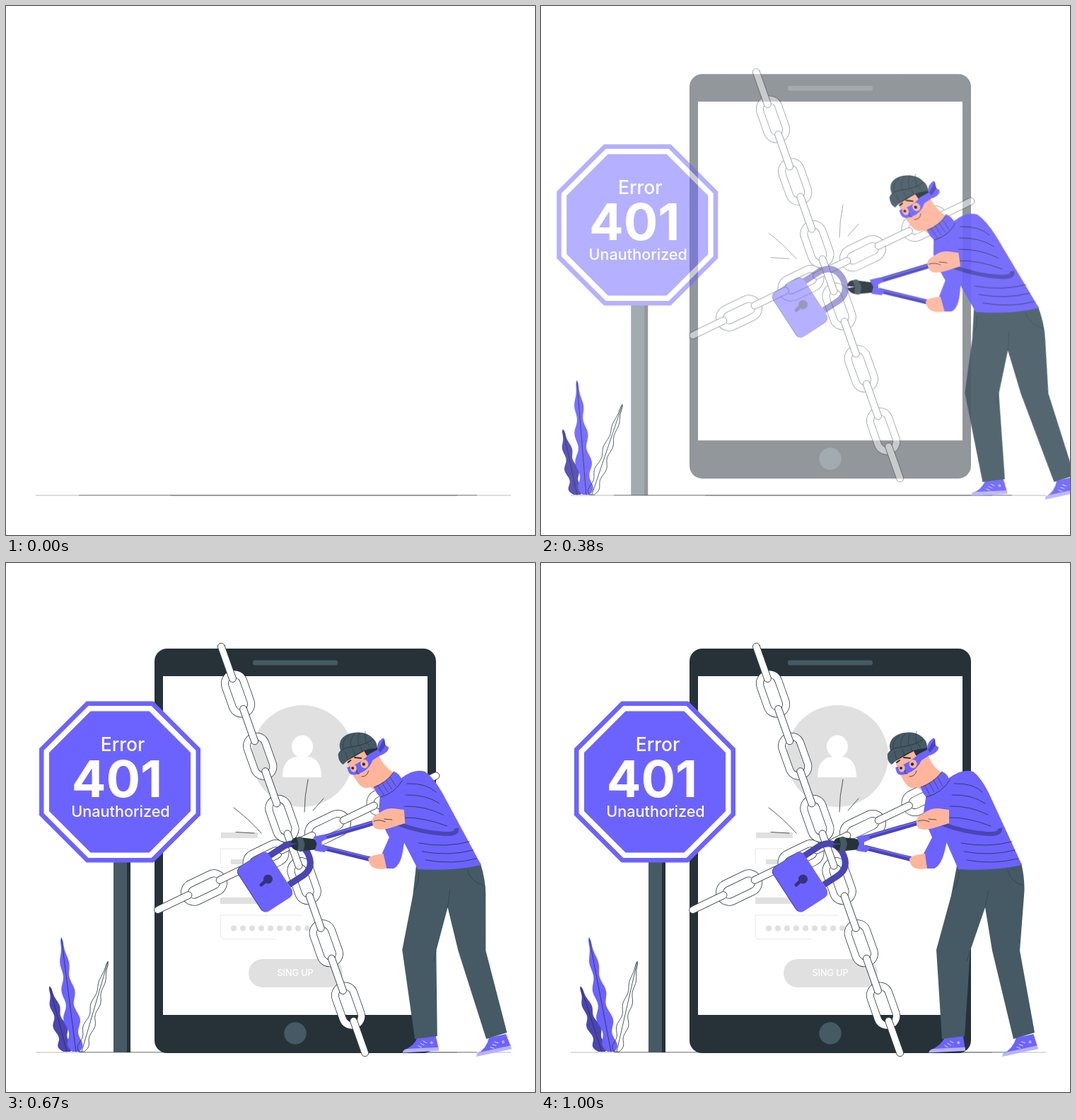
These frames come from a looping animation (748 px wide and 748 px high, 1040 ms). An HTML page:

```html
<!DOCTYPE html>
<html lang="en">
<head>
<meta charset="utf-8">
<title>Error 401</title>
<style>
  html, body { margin: 0; height: 100%; overflow: hidden; background: #fff; }
  svg { display: block; width: 100vw; height: 100vh; }
  text { font-family: Inter, "Open Sans", sans-serif; font-weight: 500; fill: #fff; text-anchor: middle; }
  .ink { fill: none; stroke: #263238; stroke-width: .8; stroke-linecap: round; }
  .purple { fill: #6c63ff; }
  .deep { fill: #4b45b2; }
  .slate { fill: #455a64; }
  .black { fill: #263238; }
  .skin { fill: #ffb59b; }
  .grey { fill: #e0e0e0; }
  .white { fill: #fff; }
  .pale { fill: #b8b3ff; }
</style>
</head>
<body>
<svg viewBox="0 0 748 748">
  <path d="M42 692H714" stroke="#aaa" stroke-width=".8"/>
  <path d="M103 691.7H666M232 692H638" stroke="#777" stroke-width=".8"/>

  <g id="phone">
    <rect class="black" x="210" y="121" width="398" height="572" rx="18"/>
    <path class="white" d="M222 160H596V639H222Z"/>
    <rect class="slate" x="349" y="137.5" width="120" height="7" rx="3"/>
    <circle class="slate" cx="409" cy="665" r="15.7"/>
  </g>

  <g id="form">
    <circle class="grey" cx="419" cy="273" r="72"/>
    <ellipse class="white" cx="419" cy="259.5" rx="15" ry="16"/>
    <path class="white" d="M391 303Q391 277 410 274H428Q446 277 446 303Z"/>
    <path class="grey" d="M304 381H356V389H304ZM318 419H341V426H318ZM303 473H356V482H303Z"/>
    <path d="M303 425V404H343M382 532H309Q303 532 303 526V498H420" fill="none" stroke="#e6e6e6"/>
    <path d="M322 516.5H427" stroke="#e0e0e0" stroke-width="8" stroke-linecap="round" stroke-dasharray="0 13"/>
    <rect class="grey" x="343" y="560" width="133" height="40" rx="20"/>
    <text x="409" y="584" font-size="12.5">SING UP</text>
  </g>

  <g id="chain"></g>

  <g id="lock">
    <path class="ink" d="M322 346Q342 361 361 382M325 380.5L351 382M427 306Q422 330 422 352M449 333L434 350"/>
    <path d="M371 415L394 400Q414 390 426 409Q437 430 420 442L400 455" fill="none" stroke="#4b45b2" stroke-width="9"/>
    <g transform="translate(366 451) rotate(-33)">
      <rect class="deep" x="-26" y="-37.5" width="52" height="75" rx="8"/>
      <rect class="purple" x="-25" y="-37" width="51" height="74.5" rx="8"/>
    </g>
    <path d="M370 447L361 455" stroke="#37327c" stroke-width="5" stroke-linecap="round"/>
    <circle cx="370.5" cy="447" r="6.5" fill="#37327c"/>
  </g>

  <g id="sign">
    <path class="slate" d="M152 420H172V692H152Z"/>
    <path class="black" d="M171 420H176V692H171Z"/>
    <g id="plate"></g>
    <text x="165" y="265.5" font-size="26.5">Error</text>
    <text x="157" y="331" font-size="72" style="font-weight:700">401</text>
    <text x="162" y="359" font-size="21.6">Unauthorized</text>
  </g>

  <g id="plant"></g>

  <g id="thief">
    <g id="shoes"></g>
    <path class="slate" d="M588 428L679 424Q685 450 683 470L677 548L698 664L668 673L638 548L628 487L607 548L599 669L567 673L559 547L580 470Z"/>
    <path class="ink" d="M628 487L633 462M607 548L602 563M591 437Q590 455 583 462M660 434Q664 452 682 456" stroke-opacity=".6"/>

    <!-- far arm and lower handle -->
    <path d="M457 402L525 419" stroke="#4b45b2" stroke-width="7"/>
    <path class="purple" d="M541 411L553 388L546 372L580 370L572 402Q567 427 556 432L543 432Z"/>
    <path class="skin" d="M521 418Q524 413 543 411L546 432Q521 436 521 418Z"/>

    <!-- torso -->
    <path class="purple" d="M545 326L577 304Q596 290 611 295Q622 303 633 325L680 427Q640 436 590 433L569 385Q558 364 541 352Z"/>
    <g id="folds" class="ink"></g>
    <path d="M565 368Q598 381 631 383Q651 384 649 375" fill="none" stroke="#4b45b2" stroke-width="6"/>

    <!-- cutter and near hand -->
    <path d="M457 389L537 366" stroke="#4b45b2" stroke-width="7"/>
    <path d="M457 387.5L537 364.5M457 400.5L521 416" stroke="#6c63ff" stroke-width="2"/>
    <path class="black" d="M413 396Q416 386 428 388L451 391V405L430 407Q416 409 413 399L424 397Z"/>
    <path class="slate" d="M422 389Q428 384 431 390L433 397L431 405Q427 411 422 406L424 397Z"/>
    <path class="purple" d="M446 387L460 384L466 389L457 394V400L465 403L460 409L446 407L450 397Z"/>
    <path class="skin" d="M531 368Q529 359 541 354Q551 346 562 347L577 349V368L554 375Q531 381 531 368Z"/>
    <path class="ink" d="M533 365Q542 362 549 366M548 362L559 363"/>

    <!-- head -->
    <path class="skin" d="M500 276Q504 295 515 311Q521 321 532 317L541 324L568 298Q548 284 546 264L526 261Z"/>
    <path class="black" d="M498 276Q514 262 545 258L548 268L542 276L530 272L527 266L503 279Z"/>
    <ellipse class="skin" cx="538" cy="279" rx="6" ry="7"/>
    <path class="purple" d="M501 289Q520 284 534 270L550 262L554 269L538 279Q532 293 517 298Q506 302 503 296Z"/>
    <path class="purple" d="M546 264Q545 253 556 247Q555 258 562 260Q563 267 550 272Z"/>
    <path class="deep" d="M547 264L557 248L558 258L550 268Z"/>
    <g class="skin"><ellipse cx="510" cy="290" rx="4.5" ry="5.5"/><ellipse cx="526" cy="284" rx="5.5" ry="6"/></g>
    <g class="black"><circle cx="509" cy="290" r="2"/><circle cx="525" cy="284.5" r="2.2"/></g>
    <path class="ink" d="M503 282L507 279M513 275L522 276" style="stroke-width:2"/>
    <path class="ink" d="M515 293Q513 299 518 298M521 302Q529 302 531 294"/>
    <path class="slate" d="M494 266C489 249 503 240 519 239.500C536 239 546 249 544 262Z"/>
    <path class="slate" d="M490 270Q492 264 506 261Q528 258 542 249Q546 253 546 261Q517 264 496 285Q489 281 490 270Z"/>
    <path class="ink" d="M493 267Q497 261 511 260Q530 257 541 249"/>
    <path class="purple" d="M537 317Q556 310 567 295Q573 296 578 307Q567 325 545 331Q539 326 537 317Z"/>
    <path class="ink" d="M537 317Q556 310 567 295M545 331Q567 325 578 307"/>
    <g id="ribs" class="ink" stroke-opacity=".7"></g>
  </g>
</svg>

<script>
const $ = id => document.getElementById(id);
const repeat = (count, make) => Array.from({length: count}, (_, n) => make(n)).join('');
const line = d => `<path d="${d}"/>`;

// Open links with edge-on links between them, from link centre (x, y) onwards
function chain(x, y, dx, dy, count) {
  const angle = Math.atan2(dy, dx) * 180 / Math.PI;
  const put = (n, shape) =>
    `<g transform="translate(${x + dx * n} ${y + dy * n}) rotate(${angle})">${shape}</g>`;
  const ring = (color, width) =>
    `<rect x="-29" y="-13.5" width="58" height="27" rx="13.5" fill="none" stroke="${color}" stroke-width="${width}"/>`;
  const link = ring('#263238', 10.8) + ring('#fff', 9.3);
  const bar = '<rect class="ink" x="-29" y="-5" width="58" height="10" rx="5" style="fill:#fff"/>';
  return repeat(count, n => put(n, link)) + repeat(count + 1, n => put(n - .5, bar));
}
$('chain').innerHTML = chain(280, 459, 87.5, -42.2, 4) + chain(328, 185, 31.2, 88.2, 6);

// Nested octagons; half is the distance from the centre to an edge
function octagon(half, color) {
  const radius = half / Math.cos(Math.PI / 8);
  const points = repeat(8, n => {
    const a = (n + .5) * Math.PI / 4;
    return `${161 + radius * Math.cos(a)},${309.5 + radius * Math.sin(a)} `;
  });
  return `<polygon points="${points}" fill="${color}" stroke="${color}" stroke-width="2" stroke-linejoin="round"/>`;
}
$('plate').innerHTML = octagon(113, '#6c63ff') + octagon(106.5, '#fff') + octagon(99, '#6c63ff');

// A rippled leaf growing from the ground to its tip, with a midrib
function leaf(kind, baseX, tipX, tipY, width, ripples) {
  const edge = [];
  for (let u = 0; u <= 1; u += .02) {
    const x = baseX + (tipX - baseX) * u, y = 691 + (tipY - 691) * u;
    const ripple = .76 - .24 * Math.cos(2 * Math.PI * (ripples * u + .35));
    const half = width * ripple * Math.sqrt(1 - u) * (1 - .6 * (1 - u) ** 20);
    edge.push([x + half, y]);
    edge.unshift([x - half, y]);
  }
  // Both sides start at the base, so the outline opens at the tip
  return `<polygon class="${kind}" points="${edge} ${tipX},${tipY}"/>` +
    `<path class="ink" d="M${baseX} 691L${tipX} ${tipY}"/>`;
}
$('plant').innerHTML = leaf('deep', 86, 56, 599, 13, 3) + leaf('purple', 99, 68, 530, 14, 4) +
  leaf('ink', 107, 136, 564, 10, 4);

// Clothing details
const shoe = (x, y, turn) => `<g transform="translate(${x} ${y}) rotate(${turn})">
  <path class="purple" d="M1 -3Q18 -8 25 -22H50L52 -2Z"/>
  <path class="pale" d="M0 0Q2 -5 8 -5H52V0Z"/><circle class="pale" cx="43" cy="-12" r="2"/>
  ${repeat(3, n => `<path d="M${23 + n * 4} ${-9 - n * 3}l5 3" stroke="#fff" stroke-width=".8"/>`)}</g>`;
$('shoes').innerHTML = shoe(548, 692.5, -3) + shoe(652, 698, -12);
$('folds').innerHTML =
  repeat(4, n => line(`M${584 - 3 * n} ${312 + 16 * n}q28 -1 ${40 + 7 * n} 12`)) +
  repeat(3, n => line(`M${594 + 4 * n} ${396 + 12 * n}q38 7 72 -2`));
$('ribs').innerHTML =
  repeat(4, n => line(`M${498 + 11 * n} ${262 - 2 * n}q-2 -11 ${9 - 3 * n} -18`)) +
  repeat(4, n => line(`M${500 + 11 * n} ${267 - 4 * n}l3 ${11 - 2 * n}`)) +
  repeat(4, n => line(`M${543 + 6 * n} ${315 - 4 * n}l7 13`));

function pose(id, opacity, transform) {
  $(id).setAttribute('opacity', opacity);
  $(id).setAttribute('transform', transform);
}

const clamp = v => Math.max(0, Math.min(1, v));

// Horizontal shift plus a skew that pivots on the ground line
const lean = (x, k) => `matrix(1 0 ${k} 1 ${x - 690 * k} 0)`;

function draw(now) {
  const time = now % 1040;
  const step = Math.min(21, Math.floor((time - 126) / 41.25));
  const shown = time < 130 ? 0 : 1;

  // Phone rises into place downwards, sign comes from the left, both settle softly
  const shift = step < 13 ? 46 * (step / 13 - 1) : Math.sin(Math.PI * (step - 13) / 8);
  const fade = shown * clamp((step + .5) / 13);
  for (const id of ['phone', 'chain', 'lock']) pose(id, fade, `translate(0 ${shift})`);
  pose('form', clamp((step - 8) / 5), `translate(0 ${shift})`);
  pose('sign', fade, `translate(${shift} 0)`);

  // Thief and plant dash in from either side, swing past upright and settle
  const glide = clamp(1 - step / 8) ** 1.5;
  const swing = Math.max(Math.sin(Math.PI * (step - 3.8) / 10.4), (step - 21) / 25);
  const dash = shown * (1 - .66 * glide);
  pose('thief', dash, lean(305 * glide + 35 * swing, .22 * swing));
  pose('plant', dash, lean(-280 * glide, -.18 * swing));
}

const start = performance.now();
(function loop() {
  draw(performance.now() - start);
  requestAnimationFrame(loop);
})();
</script>
</body>
</html>
```
